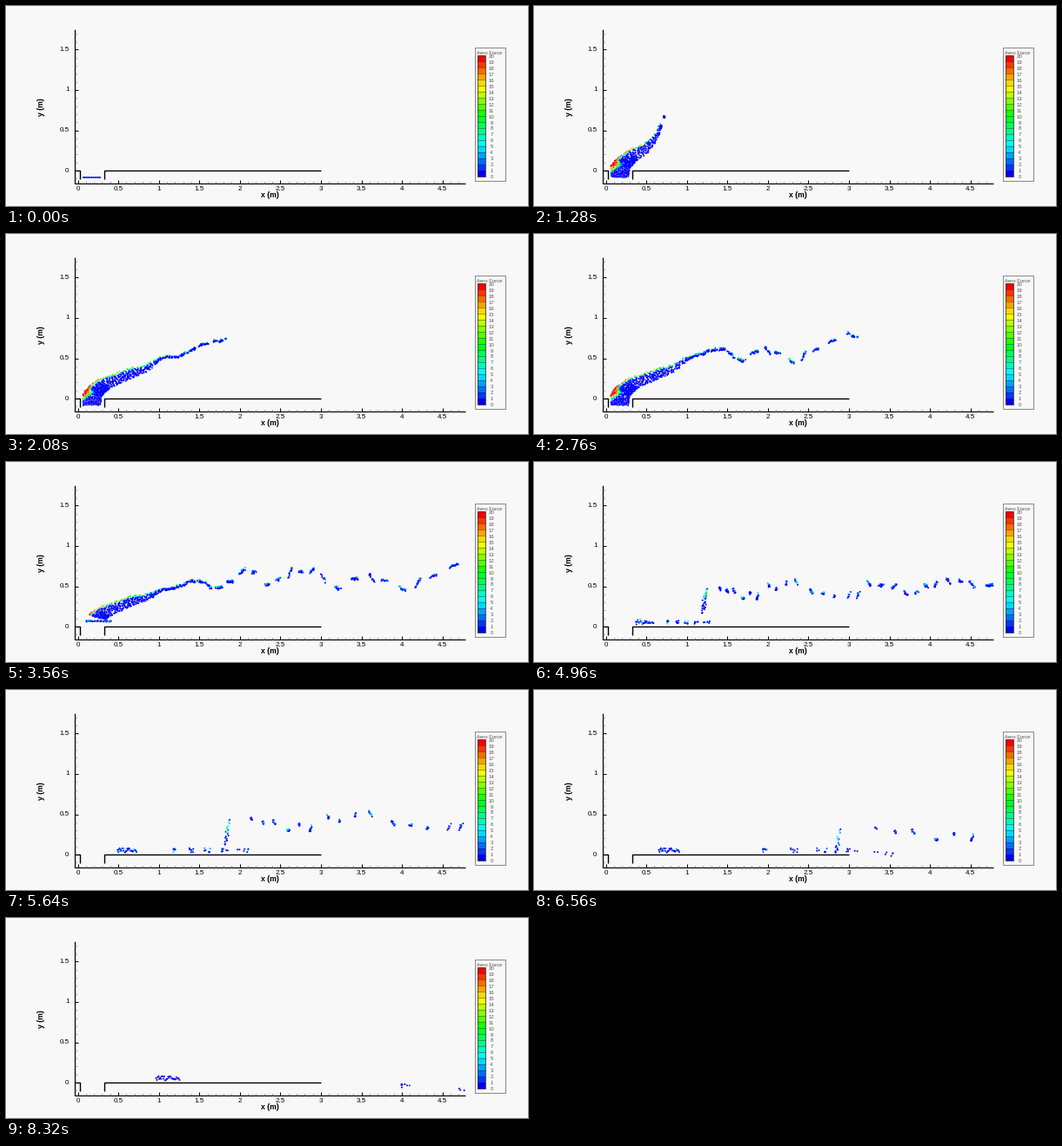
Recreate the animation shown at these times as a matplotlib script. Size 600x231 px, loop 8360 ms.

```python
import numpy as np
import matplotlib.pyplot as plt
from matplotlib.animation import FuncAnimation
from matplotlib.colors import LinearSegmentedColormap

W, H, DPI = 600, 231, 100
FRAMES, STEP = 209, 40
T = np.arange(FRAMES) * STEP / 1000
PX = 72 / DPI                      # points per pixel
X0, Y0, SCALE = 82.4, 190, 93.15   # pixel position of the origin, pixels per metre
ROW, ACROSS = 0.03, 11             # seconds between rows, particles per row
LAST_ROW, TAIL = 3.0, 0.09         # end of the jet, length of its folded tail
CUT = 4.32                         # when the remains have reached the floor

rng = np.random.default_rng(7)
cmap = LinearSegmentedColormap.from_list(
    "force", ["#0000ff", "#00ffff", "#00ff00", "#ffff00", "#ff0000"], N=20)

# Bend of the jet: centre line and half width by age
AGES = [0, 0.3, 0.6, 0.84, 1.28, 1.55]
BEND_X = [99, 100, 106, 114, 150, 150]
BEND_Y = [198.5, 186, 179, 173, 159, 159]
HALF_X = [-10.5, -11.5, -10, -5.5, -3, 0]
HALF_Y = [0, -1, -3, -6, -4.5, -1.3]


def ramp(v, start, length):
    return np.clip((v - start) / length, 0, 1)


def ease(v, start, length):
    k = ramp(v, start, length)
    return k * k * (3 - 2 * k)


def settle(x, y):
    """Keep particles above the floor and right of the inlet wall."""
    y = np.where((x > 113) & (x < 362), np.minimum(y, 188), y)
    return np.maximum(x, 87.5), y


def stream_x(age):
    d = np.maximum(age - 1.28, 0)
    return np.interp(age, AGES, BEND_X) + 113 * d + 30.5 * d * d


def stream_y(age, born):
    """Bend, then level off; the front climbs and the rest waves and sinks."""
    free = np.maximum(age - 1.28, 0)
    level = 141 + 8 * ease(born, 1.5, 1)
    y = np.interp(age, AGES, BEND_Y) + (level - 159) * ease(age, 1.28, 0.35)
    y -= 24 * age * np.exp(-born / 0.13)
    y -= 10 * free * np.exp(-((born - 1.25) / 0.3) ** 2)
    y += 6 * ease(free, 0.1, 0.6) * np.cos(2 * np.pi * (born - 2.34) / 0.38)
    return y + 3.3 * np.maximum(T - CUT, 0) ** 2


def make_clumps():
    """Birth time, slope and height of the shreds the sheet breaks into."""
    gaps = np.linspace(0.09, 0.04, 46) * rng.uniform(0.7, 1.3, 46)
    births = np.cumsum(gaps)
    births = births[births < LAST_ROW - TAIL]
    return births, rng.uniform(-150, 150, births.size), rng.normal(0, 3, births.size)


BIRTHS, SLOPES, HEIGHTS = make_clumps()


def jet_particle(row, u):
    te = row + (rng.uniform(0, ROW) if row else 0)
    tail = te > LAST_ROW - TAIL
    if tail:
        home, slope, height = LAST_ROW, 0, 0
    else:
        c = np.argmin(abs(BIRTHS - te))
        home, slope, height = BIRTHS[c], SLOPES[c], HEIGHTS[c]

    age = T - te
    drift = ramp(age, 1.5, 0.8)
    born = te + 0.6 * drift * (home - te)
    rate = 1 - 0.6 * max(home - 2.3, 0)       # late fluid is sheltered and slow
    free = T - born - 1.28
    e = 1.28 + np.where(free > 0, rate * free, free)

    narrow = min(1, 0.25 + 2.2 * te)
    width = (1 - 2 * u) * (1 + (narrow - 1) * ramp(age, 0, 0.84))
    x = stream_x(e) + width * np.interp(e, AGES, HALF_X)
    y = stream_y(e, born) + width * np.interp(e, AGES, HALF_Y)
    if tail:
        fold = ease(age, 0.9, 0.4)
        x -= (3 + 4 * u) * fold
        y += 25 * u * fold
    young = ramp(age, 0, 0.3)
    x = x + young * rng.uniform(-0.7, 0.7)
    y = y + young * rng.uniform(-0.7, 0.7) + drift * (height + slope * (te - home))

    luck = 1 + ramp(e, 1, 0.7) * (1.2 * rng.random() ** 1.3 - 1)
    depth = 0.13 + 0.28 * np.exp(-((e - 0.35) / 0.12) ** 2) + 0.5 * ramp(e, 1.2, 1.2)
    force = 21 * ramp(e, 0.1, 0.15) * np.exp(-0.55 * np.maximum(e - 0.4, 0))
    force *= np.exp(-(u / depth) ** 3) * luck

    life = 9 if rng.random() < 0.5 else rng.uniform(1.3, 2.3)
    return *settle(x, y), force, (age > -1e-6) & (e < life)


def floor_particle(te, start, x_cut, y_cut, speed, gain):
    """Rise with the jet's end, reach the floor at CUT, then slide along it."""
    dt = np.maximum(T - CUT, 0)
    x = np.interp(T, [te, te + 0.3, CUT], [start, start + 2, x_cut])
    x = x + speed * dt + gain * dt * dt
    y = np.interp(T, [te, te + 0.3, CUT, CUT + 1],
                  [198.5, 184, y_cut, rng.uniform(183, 188)])
    y = y + 0.09 * np.maximum(x - 362, 0)
    force = 16 * rng.random() ** 5 * np.exp(-0.6 * dt)
    return *settle(x, y), force, T >= te - 1e-6


def build():
    parts = []
    for row in np.arange(0, LAST_ROW, ROW):
        for i in range(ACROSS):
            parts.append(jet_particle(row, (i + 0.5) / ACROSS))
    # A slow heap that creeps along the floor
    for q in np.linspace(0, 1, 30):
        y_cut = rng.uniform(179, 192) if q < 0.25 else rng.uniform(183, 188)
        parts.append(floor_particle(LAST_ROW + 0.16 * (1 - q / 2), 89 + 10 * q,
                                    107 + 19 * q, y_cut, 16.5 + 2 * q, 0))
    # Small groups that the wind carries off, the further the faster
    for group in np.linspace(0, 1, 5):
        for _ in range(7):
            s = group + rng.uniform(-0.07, 0.07) * (0.3 + group)
            parts.append(floor_particle(LAST_ROW + 0.08 * (1 - group), 99 + 10 * s,
                                        127 + 19 * s, rng.uniform(183, 188),
                                        35 + 34 * s, 12 + 8 * s))
    return [np.array(a) for a in zip(*parts)]


PX_X, PX_Y, FORCE, ALIVE = build()
ALIVE &= PX_X < 528

fig = plt.figure(figsize=(W / DPI, H / DPI), dpi=DPI, facecolor="#f8f8f8")
ax = fig.add_axes([0, 0, 1, 1])
ax.set(xlim=(0.5, W + 0.5), ylim=(H + 0.5, 0.5))
ax.axis("off")


def line(xs, ys, px=1.0, color="black", **kw):
    ax.plot(xs, ys, color=color, lw=px * PX, solid_capstyle="butt",
            solid_joinstyle="miter", **kw)


def label(x, y, text, px, **kw):
    style = dict(ha="center", va="center", color="black", family="Liberation Sans")
    ax.text(x, y, text, size=px * PX, **{**style, **kw})


def draw_axes():
    line([79, 79, 528], [28, 206, 206], 1.2)
    for n in range(48):
        x = X0 + 0.6 + n * SCALE / 10
        major = n % 5 == 0
        line([x, x], [206, 202 if major else 204], 1, "black" if major else "#777777")
        if major:
            label(x, 211.8, f"{n / 10:g}", 8)
    for n in range(-1, 18):
        y = Y0 + 0.6 - n * SCALE / 10
        major = n % 5 == 0
        line([79, 83 if major else 81], [y, y], 1, "black" if major else "#777777")
        if major:
            label(73, y, f"{n / 10:g}", 8, ha="right")
    label(303.5, 218.8, "x (m)", 8.8, weight="bold")
    label(41, 117, "y (m)", 8.8, weight="bold", rotation=90)


def draw_legend():
    top, bottom = 58, 197.5
    band = (bottom - top) / 20
    ax.add_patch(plt.Rectangle((539, 49), 35, 154, fc="#f8f8f8", ec="#888888", lw=PX))
    label(556.5, 54.7, "Aero Force", 6, color="#555555")
    for n in range(21):
        y = bottom - n * band
        if n < 20:
            ax.add_patch(plt.Rectangle((542, y - band), 9, band, fc=cmap(n), lw=0))
        line([542, 551], [y, y], 0.8, "#222222", ls=(0, (1.2, 1.2)))
        label(558.5, y + 0.8, str(n), 6, color="#555555")
    ax.add_patch(plt.Rectangle((542, top), 9, bottom - top, fill=False,
                               ec="#333333", lw=0.8 * PX, zorder=3))


draw_axes()
draw_legend()
line([79, 85.5, 85.5], [190.5, 190.5, 200.5], 1.4)
line([113.5, 113.5, 362.5], [200.5, 190.5, 190.5], 1.4)
dots = ax.scatter([], [], s=(2 * PX) ** 2, c=[], cmap=cmap, vmin=0, vmax=20,
                  linewidths=0, zorder=4)


def update(n):
    on = ALIVE[:, n]
    dots.set_offsets(np.column_stack([PX_X[on, n], PX_Y[on, n]]))
    dots.set_array(FORCE[on, n])
    return dots,


anim = FuncAnimation(fig, update, frames=FRAMES, interval=STEP,
                     repeat=True, repeat_delay=0)
plt.show()
```
